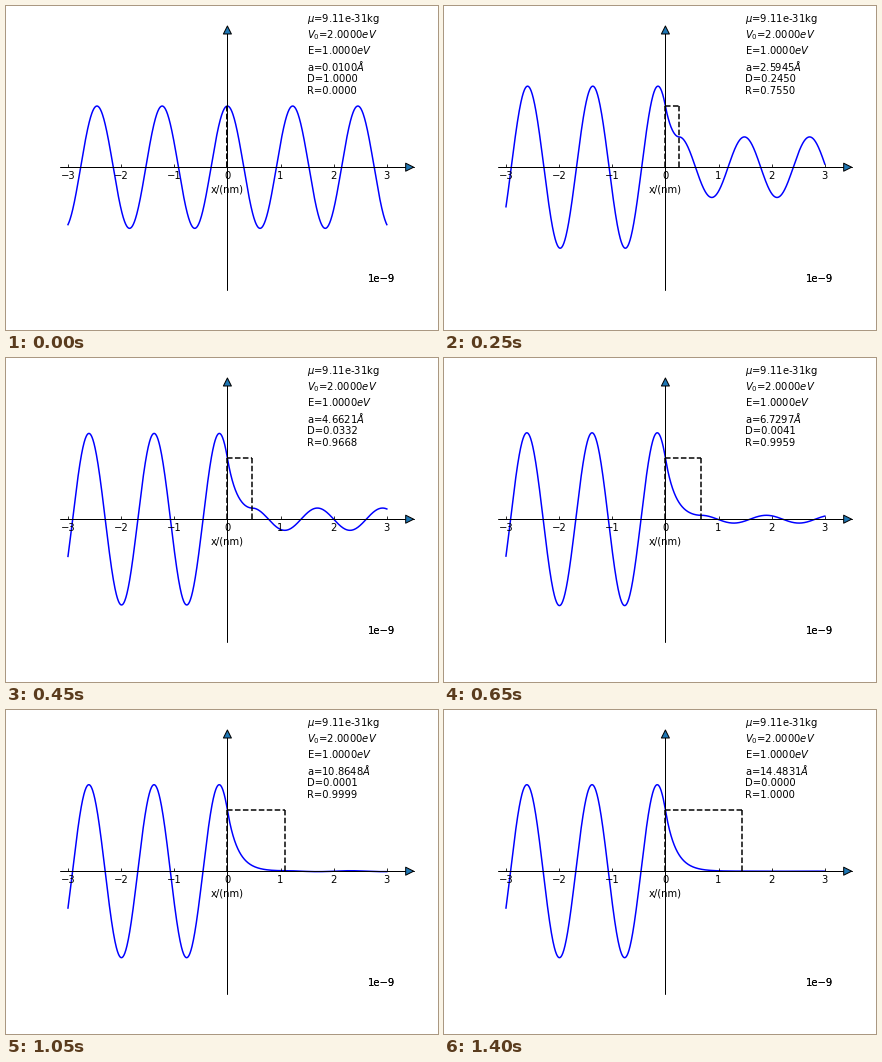
Write a matplotlib script that moves like this. It is 432x324 px and loops after 1.45 s.

```python
import numpy as np
import matplotlib.pyplot as plt
from matplotlib.animation import FuncAnimation
from matplotlib.patches import FancyArrowPatch
from matplotlib.path import Path
from matplotlib.transforms import IdentityTransform

MASS = 9.11e-31      # kg
HBAR = 1.055e-34     # J s
EV = 1.602e-19       # J
ENERGY, BARRIER = 1.0, 2.0   # eV
FRAMES, INTERVAL = 29, 50

# The barrier is twice the energy, so this is also the decay rate inside it.
K = np.sqrt(2 * MASS * ENERGY * EV) / HBAR * 1e-9   # 1/nm
WIDTHS = np.linspace(0.01, 15, FRAMES + 1)          # angstrom
X = np.linspace(-3, 3, 1201)                        # nm

plt.rcParams.update({"font.family": "DejaVu Sans", "font.size": 10})
fig = plt.figure(figsize=(6, 4.5), dpi=72, facecolor="white")
ax = fig.add_axes([0.125, 0.125, 0.775, 0.755])
ax.set(xlim=(-3.15, 3.15), ylim=(-2, 2))
ax.set_axis_off()


def arrow(start, end, extend):
    points = ax.transData.transform([start, end])
    points[1] += extend
    ax.add_artist(FancyArrowPatch(
        path=Path(points), arrowstyle="-|>", mutation_scale=20,
        shrinkA=0, shrinkB=0, lw=1, ec="black", fc="C0", zorder=2.5,
        transform=IdentityTransform(), clip_on=False))


def label(text, xy, dy, ha="center", coords="data"):
    ax.annotate(text, xy, xytext=(0, dy), xycoords=coords,
                textcoords="offset points", ha=ha)


def wave(a):
    """Real part of the stationary state for a barrier of width a."""
    left = np.cos(K * X) - np.tanh(K * a) * np.sin(K * X)
    inside = np.cosh(K * (X - a)) / np.cosh(K * a)
    right = np.cos(K * (X - a)) / np.cosh(K * a)
    return np.where(X < 0, left, np.where(X < a, inside, right))


arrow((-3.15, 0), (3.15, 0), (20, 0))
arrow((0, -2), (0, 2), (0, 20))

ticks = np.arange(-3, 4)
ax.plot(ticks, 0 * ticks, ls="", marker=2, ms=3.5, mew=0.8, color="black",
        zorder=2.5)
for t in ticks:
    label(f"{t}".replace("-", "\u2212"), (t, 0), -12)
label("x/(nm)", (0, 0), -25)
for _ in range(2):   # drawn twice for a heavier look
    label("1e\u22129", (1, 0), 7.5, "right", "axes fraction")

curve, = ax.plot([], [], color="blue", lw=1.5)
walls = [ax.plot([], [], "k--", lw=1.5)[0] for _ in range(3)]
info = ax.text(1.5, 1.2, "")


def update(i):
    width = WIDTHS[i]
    a = width / 10
    through = 1 / np.cosh(K * a) ** 2
    curve.set_data(X, wave(a))
    walls[0].set_data([0, 0], [0, 1])
    walls[1].set_data([0, a], [1, 1])
    walls[2].set_data([a, a], [0, 1])
    info.set_text("\n".join([
        rf"$\mu$={MASS:.2e}kg",
        rf"$V_0$={BARRIER:.4f}$eV$",
        rf"E={ENERGY:.4f}$eV$",
        rf"a={width:.4f}$\AA$",
        f"D={through:.4f}",
        f"R={1 - through:.4f}"]))
    return [curve, *walls, info]


anim = FuncAnimation(fig, update, frames=FRAMES, interval=INTERVAL,
                     repeat=True, repeat_delay=0)
plt.show()
```
